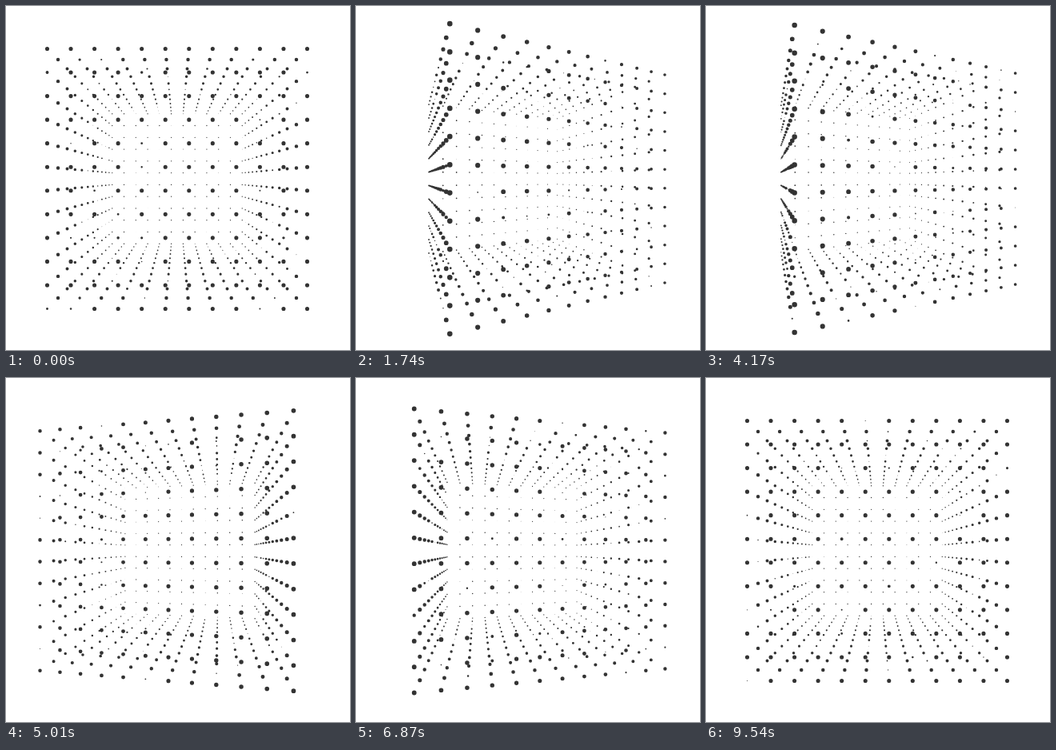
An HTML page with a canvas that plays this animation: 430 by 430 pixels, repeating every 9.57 s.

```html
<!DOCTYPE html>
<html lang="en">
<head>
<meta charset="utf-8">
<title>Dotted cube</title>
<style>
  html, body { margin: 0; width: 100%; height: 100%; overflow: hidden; background: #fff; }
  canvas { display: block; width: 430px; height: 430px; }
</style>
</head>
<body>
<canvas id="stage" width="430" height="430"></canvas>
<script>
const ctx = document.getElementById('stage').getContext('2d');
const SIZE = 430, CX = 214, CY = 216;
const SIDE = 12, FOCAL = 325, DISTANCE = 3;
const STEP_MS = 30, STEPS = 319;

// Hollow cube: keep only the grid points lying on a face.
const points = [];
const last = SIDE - 1;
const onFace = i => i === 0 || i === last;
const coord = i => 2 * i / last - 1;
for (let i = 0; i < SIDE; i++)
  for (let j = 0; j < SIDE; j++)
    for (let k = 0; k < SIDE; k++)
      if (onFace(i) || onFace(j) || onFace(k))
        points.push([coord(i), coord(j), coord(k)]);

// Repeatable pseudo-random value in 0..1.
function hash(a, b) {
  let h = Math.imul(a + 1, 374761393) ^ Math.imul(b + 1, 668265263);
  h = Math.imul(h ^ (h >>> 15), 2246822519);
  h = Math.imul(h ^ (h >>> 13), 3266489917);
  return ((h ^ (h >>> 16)) >>> 0) / 4294967296;
}

// Most dots keep full size; a few shrink for one step.
function flicker(index, step) {
  const r = hash(index, step);
  return r < 0.14 ? 0.2 + r * 4 : 1;
}

function draw(step) {
  const angle = 2 * Math.PI * step / (STEPS - 1);
  const cos = Math.cos(angle), sin = Math.sin(angle);
  ctx.fillStyle = '#fff';
  ctx.fillRect(0, 0, SIZE, SIZE);
  ctx.fillStyle = '#333';
  ctx.beginPath();
  points.forEach(([x, y, z], index) => {
    const scale = FOCAL / (DISTANCE - x * sin - z * cos);
    const px = CX + (x * cos - z * sin) * scale;
    const py = CY + y * scale;
    const radius = (0.65 + (scale - 81) * 0.0235) * flicker(index, step);
    ctx.moveTo(px + radius, py);
    ctx.arc(px, py, radius, 0, 2 * Math.PI);
  });
  ctx.fill();
}

const start = performance.now();
function tick() {
  const elapsed = Math.max(0, performance.now() - start);
  draw(Math.floor(elapsed / STEP_MS) % STEPS);
  requestAnimationFrame(tick);
}
tick();
</script>
</body>
</html>
```
